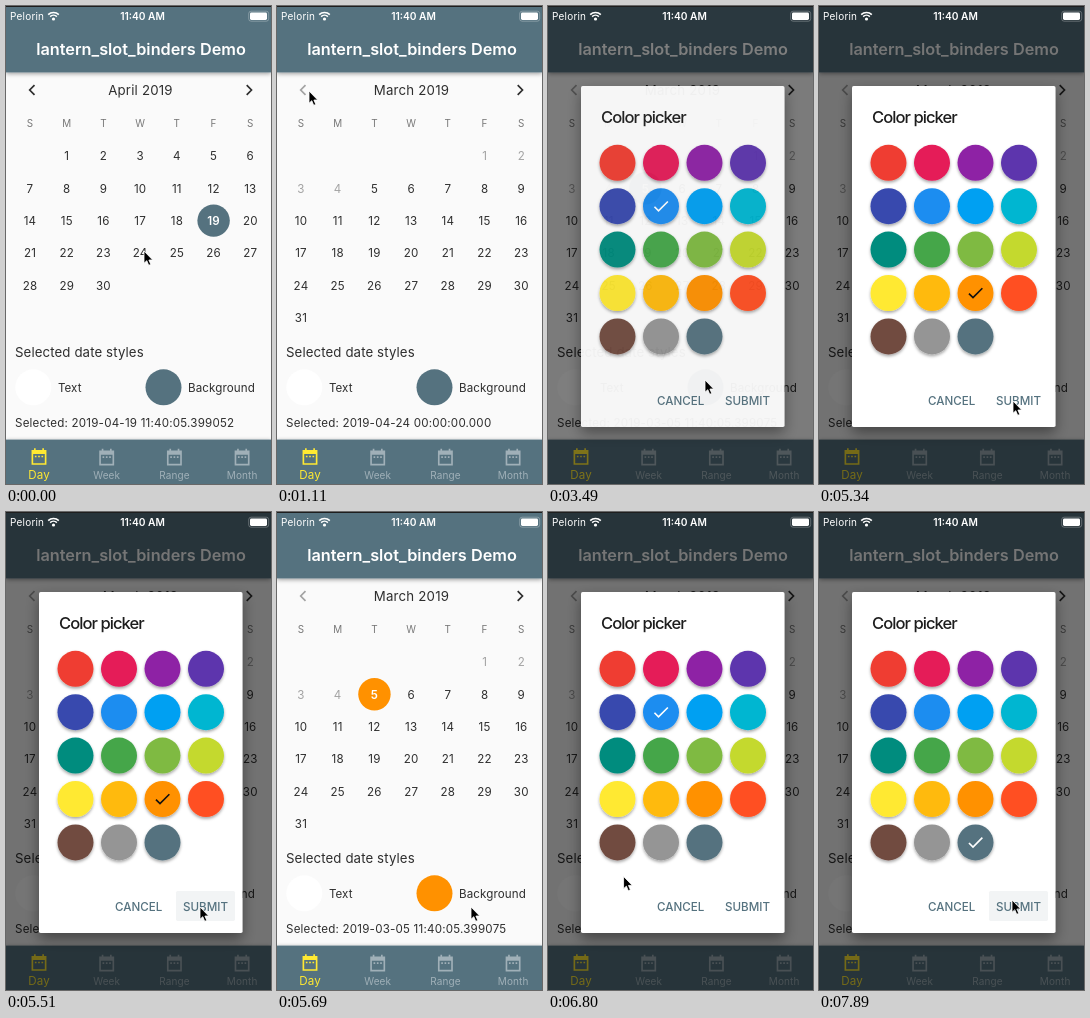
An HTML page that plays this animation: 265x478 px, repeating every 8000 ms.

```html
<!DOCTYPE html>
<html lang="en">
<head>
<meta charset="utf-8">
<title>Date picker demo</title>
<style>
  html, body { margin: 0; width: 100%; height: 100%; overflow: hidden; background: #fafafa; }
  svg { display: block; width: 100vw; height: 100vh; font-family: Inter, Roboto, sans-serif; }
</style>
</head>
<body>
<svg id="stage" viewBox="0 0 265 478"></svg>
<script>
const LOOP = 8000;
const BAR = '#55727f', INK = '#2e2e2e', MUTED = '#a3a3a3', YELLOW = '#ffe932', ORANGE = '#ff9100';
const PALETTE = [
  '#ef3d30', '#e51a59', '#8e24a5', '#5d35ad',
  '#384aae', '#1f8df0', '#02a0f2', '#02b6d1',
  '#018c7e', '#45a64a', '#7fba43', '#c4d92e',
  '#ffe932', '#ffba0b', ORANGE, '#ff5022',
  '#714c41', '#959595', BAR
];
const BLUE_INDEX = 5, ORANGE_INDEX = 14, GREY_INDEX = 18;

// The picture refreshes only at these moments, like a slow screen recording.
const TICKS = [
  0, 160, 480, 640, 800, 1110, 1280, 1430, 1590, 1750, 1900, 2060, 2230, 2390,
  2710, 2860, 3010, 3490, 3610, 3930, 4080, 4400, 4730, 4890, 5040, 5200, 5340,
  5510, 5690, 5840, 6000, 6150, 6310, 6460, 6640, 6800, 6940, 7100, 7260, 7420,
  7570, 7730, 7890
];

const CURSOR_START = [138, 245];
const CURSOR_MOVES = [ // start, end, x, y
  [330, 800, 32, 85],
  [1180, 2060, 97, 182],
  [2560, 3010, 157, 374],
  [3770, 4080, 157, 291],
  [4570, 5200, 194, 395],
  [5690, 6150, 34, 381],
  [6640, 7050, 157, 332],
  [7300, 7730, 193, 388]
];

const clamp = v => Math.max(0, Math.min(1, v));
const ease = v => v * v * (3 - 2 * v);

function text(value, x, y, size, { fill = INK, weight = 400, anchor = 'start', spacing = 0.2 } = {}) {
  return `<text x="${x}" y="${y + size * 0.39}" font-size="${size}" fill="${fill}" font-weight="${weight}"
    text-anchor="${anchor}" letter-spacing="${spacing}">${value}</text>`;
}
const centered = (value, x, y, size, style) => text(value, x, y, size, { ...style, anchor: 'middle' });
const circle = (x, y, r, fill, extra = '') => `<circle cx="${x}" cy="${y}" r="${r}" fill="${fill}" ${extra}/>`;
const rect = (x, y, w, h, fill, extra = '') =>
  `<rect x="${x}" y="${y}" width="${w}" height="${h}" fill="${fill}" ${extra}/>`;
const line = (d, color, width) => `<path d="${d}" fill="none" stroke="${color}" stroke-width="${width}"/>`;

function statusBar() {
  const arc = r => line(`M${47.5 - r * 0.7} ${14 - r * 0.7}A${r} ${r} 0 0 1 ${47.5 + r * 0.7} ${14 - r * 0.7}`, '#fff', 1.6);
  return rect(0, 0, 265, 1, '#1e1e1e') +
    text('Pelorin', 4, 10.5, 10, { fill: '#fff' }) + arc(7.6) + arc(4.8) + circle(47.5, 13, 1.6, '#fff') +
    centered('11:40 AM', 136.5, 10.5, 10.2, { fill: '#fff', weight: 600, spacing: 0 }) +
    rect(242.7, 5.2, 20, 10, 'none', 'rx="2.4" stroke="#fff" stroke-width=".8" opacity=".35"') +
    rect(244, 6.5, 17, 7.5, '#fff', 'rx="1.4"');
}

function calendar(month, selectedDay, accent) {
  const march = month === 'March';
  const firstColumn = march ? 5 : 1, days = march ? 31 : 30, firstEnabled = march ? 5 : 1;
  const columnX = c => 24 + c * 36.72;
  let out = centered(month + ' 2019', 134.5, 84, 13.25) +
    line('M28.5 79.2l-4.8 4.8 4.8 4.8', march ? MUTED : INK, 1.7) +
    line('M240.7 79.2l4.8 4.8-4.8 4.8', INK, 1.7);
  [...'SMTWTFS'].forEach((name, c) => out += centered(name, columnX(c), 117.5, 9.9, { fill: '#777' }));
  for (let day = 1; day <= days; day++) {
    const cell = day - 1 + firstColumn;
    const x = columnX(cell % 7), y = 149.8 + Math.floor(cell / 7) * 32.3;
    const selected = day === selectedDay;
    if (selected) out += circle(x, y + 0.2, 16.2, accent);
    const fill = selected ? '#fff' : day < firstEnabled ? MUTED : INK;
    out += centered(day, x, y, 11.6, { fill, weight: selected ? 600 : 400 });
  }
  return out;
}

function tab(name, x, active) {
  const color = active ? YELLOW : '#a0b0b8', top = active ? 440.6 : 441.2;
  const icon = 'M4 5h16v16H4zM4 7h16M4 8h16M7 2v4M17 2v4M7 12h2M11 12h2M15 12h2';
  return `<g transform="translate(${x - 9.94} ${top}) scale(.828)">${line(icon, color, 2)}</g>` +
    centered(name, x, active ? 468 : 468.8, active ? 11.6 : 10, { fill: color, spacing: 0.1 });
}

function page(state) {
  return rect(0, 0, 265, 478, '#fafafa') +
    rect(0, 0, 265, 66.4, BAR, 'filter="url(#barShadow)"') +
    centered('lantern_slot_binders Demo', 135, 42.7, 16.3, { fill: '#fff', weight: 600, spacing: 0 }) +
    calendar(state.month, state.day, state.accent) +
    text('Selected date styles', 9, 345.5, 13.25, { spacing: 0.1 }) +
    circle(27.3, 381.3, 18, '#fff') + text('Text', 52, 381.3, 11.6, { spacing: 0 }) +
    circle(157.5, 381.3, 18, state.accent) + text('Background', 182, 381.3, 11.6, { spacing: 0.1 }) +
    text('Selected: ' + state.selected, 9, 416.5, 11.6) +
    rect(0, 433.6, 265, 45, BAR, 'filter="url(#barShadow)"') +
    ['Day', 'Week', 'Range', 'Month'].map((name, i) => tab(name, 33 + i * 67.7, i === 0)).join('');
}

function dialog(opacity, checked, pressed) {
  const swatches = PALETTE.map((color, i) => {
    const x = 69.5 + (i % 4) * 43.5, y = 156.8 + Math.floor(i / 4) * 43.4;
    const mark = i === checked
      ? `<g transform="translate(${x - 9.94} ${y - 9.94}) scale(.828)">` +
        line('M4.1 12.7L9 17.6L20.3 6.3', color === ORANGE ? '#111' : '#fff', 2) + '</g>'
      : '';
    return circle(x, y, 18, color, 'filter="url(#swatchShadow)"') + mark;
  }).join('');
  const button = { fill: BAR, weight: 500, spacing: 0 };
  return rect(0, 0, 265, 478, '#000', `opacity="${0.54 * opacity}"`) +
    `<g opacity="${opacity}">` +
    rect(33, 80, 203.5, 341, '#fff', 'rx="1.7" filter="url(#dialogShadow)"') +
    text('Color picker', 53, 111, 16.56, { fill: '#1d1d1d', weight: 500, spacing: -0.95 }) + swatches +
    (pressed ? rect(170, 379, 59, 30, '#f2f4f5', 'rx="1.7"') : '') +
    text('CANCEL', 109, 394, 11.6, button) + text('SUBMIT', 177, 394, 11.6, button) + '</g>';
}

function cursor(t) {
  let [x, y] = CURSOR_START;
  for (const [start, end, toX, toY] of CURSOR_MOVES) {
    const k = ease(clamp((t - start) / (end - start)));
    x += (toX - x) * k;
    y += (toY - y) * k;
  }
  return `<path transform="translate(${x} ${y})" d="M0 0V12.2L2.8 9.7L4.7 14.3L6.8 13.4L4.9 9H8.7Z"
    fill="#000" stroke="#fff" stroke-width=".8"/>`;
}

function pageState(t) {
  const accent = t < 5690 ? BAR : ORANGE;
  if (t < 160) return { accent, month: 'April', day: 19, selected: '2019-04-19 11:40:05.399052' };
  if (t < 2230) {
    const month = t < 1110 ? 'April' : 'March';
    return { accent, month, day: month === 'April' ? 24 : 0, selected: '2019-04-24 00:00:00.000' };
  }
  return { accent, month: 'March', day: 5, selected: '2019-03-05 11:40:05.399075' };
}

function dialogLayer(t) {
  const first = t < 5690;
  const opacity = clamp((t - (first ? 3350 : 6332)) / 150);
  if (!opacity) return '';
  const checked = first ? (t < 4400 ? BLUE_INDEX : ORANGE_INDEX) : (t < 7260 ? BLUE_INDEX : GREY_INDEX);
  return dialog(opacity, checked, t >= (first ? 5510 : 7890));
}

const shadow = (id, dy, blur, alpha) =>
  `<filter id="${id}" x="-30%" y="-30%" width="160%" height="170%">
    <feDropShadow dx="0" dy="${dy}" stdDeviation="${blur}" flood-color="#000" flood-opacity="${alpha}"/></filter>`;
const DEFS = '<defs>' + shadow('barShadow', 1.2, 2, 0.4) + shadow('swatchShadow', 1.8, 1.4, 0.35) +
  shadow('dialogShadow', 6, 7, 0.4) + '</defs>';

const stage = document.getElementById('stage');
let shown = -1;

function frame() {
  const now = performance.now() % LOOP;
  const t = TICKS.findLast(tick => tick <= now);
  if (t !== shown) {
    shown = t;
    stage.innerHTML = DEFS + page(pageState(t)) + dialogLayer(t) + statusBar() + cursor(t);
  }
  requestAnimationFrame(frame);
}
frame();
</script>
</body>
</html>
```
